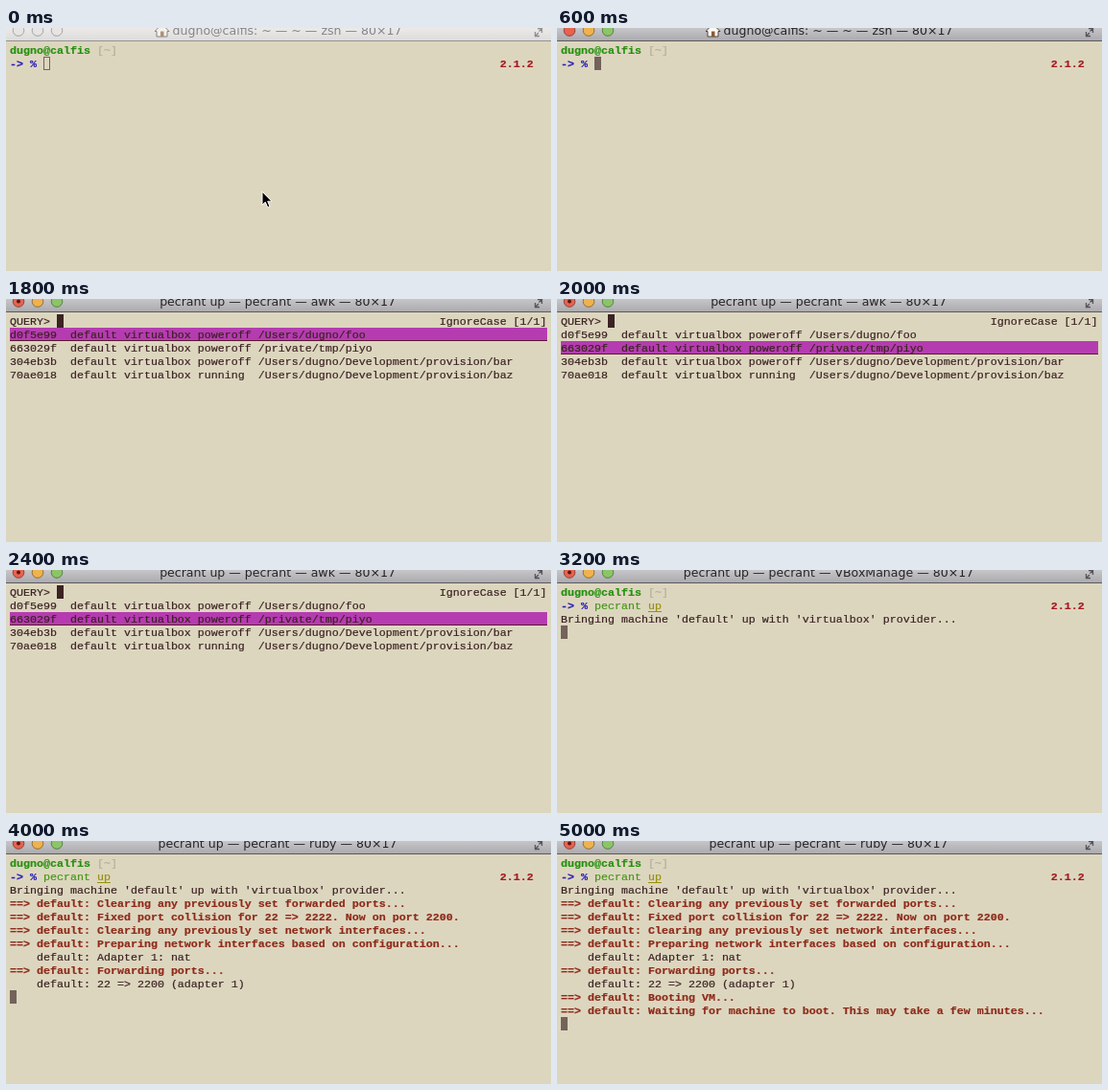
Animation, 568 px wide and 254 px high, one loop 5.2 s. Source, as an HTML page:

```html
<!DOCTYPE html>
<html lang="en">
<head>
<meta charset="utf-8">
<title>Terminal session</title>
<style>
html, body { margin: 0; width: 100%; height: 100%; overflow: hidden; }
#stage { position: relative; width: 568px; height: 254px; overflow: hidden; background: #ddd6bf; }
#stage > * { position: absolute; }
#bar {
  left: 0; top: 0; width: 568px; height: 14px; box-sizing: border-box;
  background: linear-gradient(#c6c5c8, #abaaae); border-bottom: 1px solid #5c5a5c;
}
#title {
  left: 0; top: -5px; width: 566px; text-align: center; white-space: pre;
  font: 12.56px/15px "DejaVu Sans", sans-serif; color: #262428;
}
#home { left: 155px; top: 0; }
#lights, #full { left: 0; top: 0; }
.off #bar { background: linear-gradient(#ebeae8, #dddcdc); border-color: #94928f; }
.off #title { color: #85838c; }
.off #home, .off #full { opacity: .6; }
.off #lights circle { fill: #e6e5e3; stroke: #a3a2a3; }
#dot { display: none; }
.busy #dot { display: inline; }
#text {
  left: 4px; top: 17px; margin: 0; color: #3b2322;
  font: 11.667px/14px "Liberation Mono", monospace;
  -webkit-text-stroke: .2px currentColor;
}
#sel { left: 4px; width: 560px; height: 14px; box-sizing: border-box; background: #b53cb0; border-bottom: 1px solid #5a1a30; }
#cur { width: 7px; height: 14px; box-sizing: border-box; background: #73635a; }
.off #cur { background: none; border: 1px solid #73635a; }
.query #cur { background: #3b2322; }
.user { color: #25900f; }
.dim { color: #b4ae9a; }
.sign { color: #2c1eb4; }
.cmd { color: #459818; }
.arg, .path { color: #98900c; }
.path { text-decoration: underline 1px; text-underline-offset: 2px; }
.bad { color: #a41a20; }
.log { color: #8e2a19; }
</style>
</head>
<body>
<div id="stage">
  <div id="bar"></div>
  <svg id="lights" width="70" height="12">
    <circle cx="13" cy="2.5" r="5.8" fill="#e8624e" stroke="#8c4238"/>
    <circle cx="33" cy="2.5" r="5.8" fill="#efb24c" stroke="#946c34"/>
    <circle cx="53" cy="2.5" r="5.8" fill="#8cc468" stroke="#54803f"/>
    <circle id="dot" cx="13" cy="2.5" r="2" fill="#5a1410"/>
  </svg>
  <svg id="home" width="16" height="10">
    <path d="M0 3.5L7.5-4L15 3.5L13 3.5V9H2V3.5Z" fill="#fbf9f2" stroke="#54423a"/>
    <path d="M6 9V3.5H9.5V9Z" fill="#8a5a38"/>
  </svg>
  <div id="title"></div>
  <svg id="full" width="568" height="12" fill="none" stroke="#55535a" stroke-width="1.3">
    <path d="M551.5 4V8.5H556M551.5 8.5L555 5M558.5 5V.5H554M558.5 .5L555.5 3.5"/>
  </svg>
  <div id="sel"></div>
  <div id="cur"></div>
  <pre id="text"></pre>
  <svg id="mouse" width="14" height="20">
    <path d="M1 1V15L4.3 12L6.7 17.5L9 16.5L6.7 11.2H11Z" fill="#000" stroke="#fff"/>
  </svg>
</div>
<script>
const $ = id => document.getElementById(id);
const LOOP = 5200, COL = 7, ROW = 14, LEFT = 4, TOP = 16;
const user = 'dugno', host = 'calfis';

const tag = (cls, s) => `<span class="${cls}">${s}</span>`;
const bold = (cls, s) => `<b class="${cls}">${s}</b>`;
const log = s => bold('log', '==&gt; default: ' + s);
const info = s => '    default: ' + s;
const running = name => `pecrant up — pecrant — ${name} — 80×17`;
const shell = `${user}@${host}: ~ — ~ — zsh — 80×17`;

// Prompt with the typed command; the version stays in column 73.
function prompt(typed, cmdClass, argClass) {
  const [cmd, arg = ''] = typed.split(' ');
  return [
    bold('user', `${user}@${host}`) + ' ' + tag('dim', '[~]'),
    bold('sign', '-&gt;') + ' ' + bold('sign', '%') + ' ' + tag(cmdClass, cmd) +
      (typed.includes(' ') ? ' ' : '') + tag(argClass, arg) +
      ' '.repeat(68 - typed.length) + bold('bad', '2.1.2')
  ];
}

const query = 'QUERY&gt;' + ' '.repeat(58) + 'IgnoreCase [1/1]';
const dev = `/Users/${user}/Development/provision/`;
const machines = [
  ['d0f5e99', 'poweroff', `/Users/${user}/foo`],
  ['663029f', 'poweroff', '/private/tmp/piyo'],
  ['304eb3b', 'poweroff', dev + 'bar'],
  ['70ae018', 'running ', dev + 'baz']
].map(([id, state, dir]) => `${id}  default virtualbox ${state} ${dir}`);

const output = [
  "Bringing machine 'default' up with 'virtualbox' provider...",
  log('Clearing any previously set forwarded ports...'),
  log('Fixed port collision for 22 =&gt; 2222. Now on port 2200.'),
  log('Clearing any previously set network interfaces...'),
  log('Preparing network interfaces based on configuration...'),
  info('Adapter 1: nat'),
  log('Forwarding ports...'),
  info('22 =&gt; 2200 (adapter 1)'),
  log('Booting VM...'),
  log('Waiting for machine to boot. This may take a few minutes...')
];

const type = (at, typed, more = {}) => ({
  at, title: shell, col: 5 + typed.length, row: 1,
  lines: prompt(typed, typed.length < 7 ? 'bad' : 'cmd', 'arg'), ...more
});
const pick = (at, sel, list = machines) => ({
  at, title: running('awk'), cls: 'busy query', col: 7, row: 0, sel,
  lines: [query, ...list]
});
const run = (at, name, count) => ({
  at, title: running(name), cls: 'busy', col: 0, row: 2 + count,
  lines: [...prompt('pecrant up', 'cmd', 'path'), ...output.slice(0, count)]
});

const scenes = [
  type(0, '', { cls: 'off', mouse: [266, 170] }),
  type(400, '', { mouse: [290, 229] }),
  type(600, ''),
  type(800, 'pecr'),
  type(1000, 'pecrant '),
  type(1200, 'pecrant up'),
  run(1400, 'bash', 0),
  pick(1600, 0, []),
  pick(1800, 1),
  pick(2000, 2),
  pick(2200, 3),
  pick(2400, 2),
  run(2600, 'ruby', 0),
  run(3200, 'VBoxManage', 1),
  run(3400, 'ruby', 1),
  run(3600, 'VBoxManage', 2),
  run(3800, 'ruby', 3),
  run(4000, 'ruby', 8),
  run(4400, 'VBoxManage', 8),
  run(5000, 'ruby', 10)
];

const place = (el, x, y) => { el.style.left = x + 'px'; el.style.top = y + 'px'; };
const show = (el, on) => { el.style.display = on ? '' : 'none'; };

function draw(s) {
  const home = s.title === shell;
  $('stage').className = s.cls || '';
  $('title').textContent = s.title;
  $('title').style.left = home ? '10px' : '0';
  show($('home'), home);
  $('text').innerHTML = s.lines.join('\n');
  place($('cur'), LEFT + s.col * COL, TOP + s.row * ROW);
  show($('sel'), s.sel);
  if (s.sel) place($('sel'), LEFT, TOP + s.sel * ROW);
  show($('mouse'), s.mouse);
  if (s.mouse) place($('mouse'), ...s.mouse);
}

let current;
function tick() {
  const t = performance.now() % LOOP;
  const scene = scenes.findLast(s => s.at <= t);
  if (scene !== current) draw(current = scene);
  requestAnimationFrame(tick);
}
tick();
</script>
</body>
</html>
```
